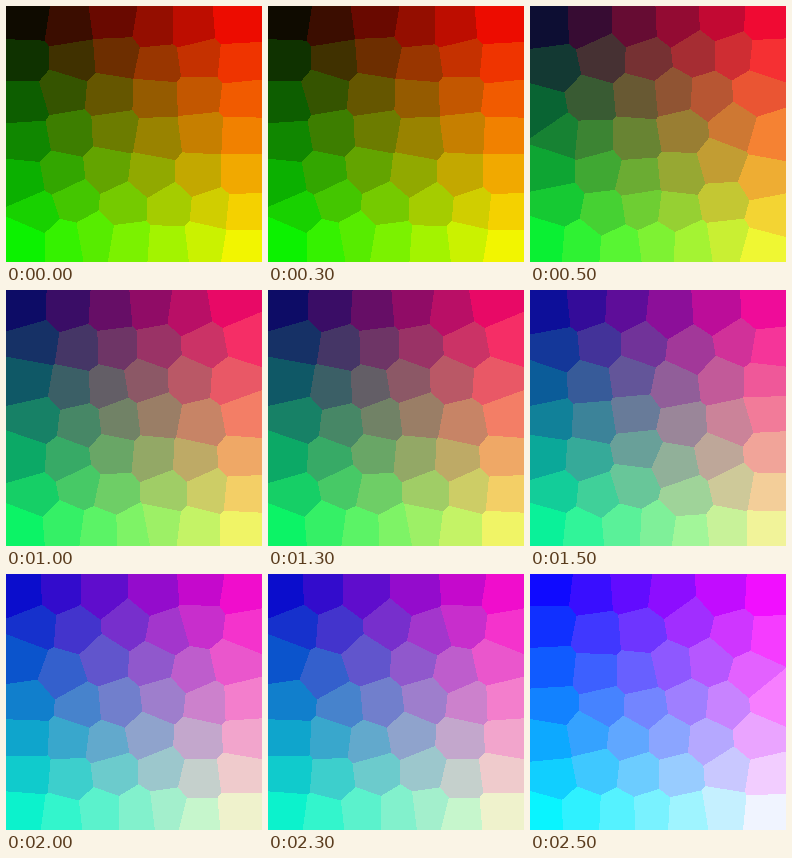
These frames come from a looping animation (256 by 256 pixels, 3 s). An HTML page with a canvas:

```html
<!DOCTYPE html>
<html>
<head>
<meta charset="utf-8">
<style>
html, body { margin: 0; width: 100%; height: 100%; overflow: hidden; background: #000; }
canvas { display: block; width: 100vw; height: 100vh; image-rendering: pixelated; }
</style>
</head>
<body>
<canvas id="stage" width="256" height="256"></canvas>
<script>
const SIZE = 256, SLICES = 6, STEP_MS = 500;
const ROWS = 7, COLUMNS = 6, STAGGER = 0.12, JITTER = 0.28, CONTRAST = 1.05;

function seededRandom(seed) {
  return () => {
    seed = (seed + 0x6D2B79F5) | 0;
    let t = Math.imul(seed ^ (seed >>> 15), 1 | seed);
    t = (t + Math.imul(t ^ (t >>> 7), 61 | t)) ^ t;
    return ((t ^ (t >>> 14)) >>> 0) / 4294967296;
  };
}

// Staggered rows with random offsets; the bottom row holds one more cell.
function plantSeeds(random) {
  const seeds = [];
  const jitter = () => (random() * 2 - 1) * JITTER;
  for (let row = 0; row < ROWS; row++) {
    const count = row === ROWS - 1 ? COLUMNS + 1 : COLUMNS;
    const shift = row % 2 ? STAGGER : -STAGGER;
    for (let col = 0; col < count; col++) {
      seeds.push({
        x: (col + 0.5 + shift + jitter()) * SIZE / count,
        y: (row + 0.5 + jitter()) * SIZE / ROWS
      });
    }
  }
  return seeds;
}

function assignCells(seeds) {
  const cells = new Uint8Array(SIZE * SIZE);
  for (let i = 0; i < cells.length; i++) {
    const x = i % SIZE, y = Math.floor(i / SIZE);
    let best = Infinity;
    seeds.forEach((seed, k) => {
      const dx = seed.x - x, dy = seed.y - y, distance = dx * dx + dy * dy;
      if (distance < best) { best = distance; cells[i] = k; }
    });
  }
  return cells;
}

function centroids(cells, count) {
  const sums = Array.from({ length: count }, () => ({ x: 0, y: 0, n: 0 }));
  cells.forEach((k, i) => {
    const sum = sums[k];
    sum.x += i % SIZE;
    sum.y += Math.floor(i / SIZE);
    sum.n++;
  });
  return sums.map(({ x, y, n }) => ({ x: x / n, y: y / n }));
}

const channel = position => 127.5 + (position - 127.5) * CONTRAST;

// Red follows x, green follows y, blue grows from slice to slice.
function paintSlice(index) {
  const rough = plantSeeds(seededRandom(index + 1));
  const seeds = centroids(assignCells(rough), rough.length);
  const cells = assignCells(seeds);
  const blue = 255 * index / (SLICES - 1);
  const colours = centroids(cells, seeds.length)
    .map(({ x, y }) => [channel(x), channel(y), blue, 255]);
  const image = new ImageData(SIZE, SIZE);
  cells.forEach((k, i) => image.data.set(colours[k], i * 4));
  return image;
}

const ctx = document.getElementById("stage").getContext("2d");
const images = Array.from({ length: SLICES }, (_, index) => paintSlice(index));
const start = performance.now();
let shown = -1;

function draw() {
  const index = Math.floor((performance.now() - start) / STEP_MS) % SLICES;
  if (index !== shown) ctx.putImageData(images[index], 0, 0);
  shown = index;
  requestAnimationFrame(draw);
}
draw();
</script>
</body>
</html>
```
